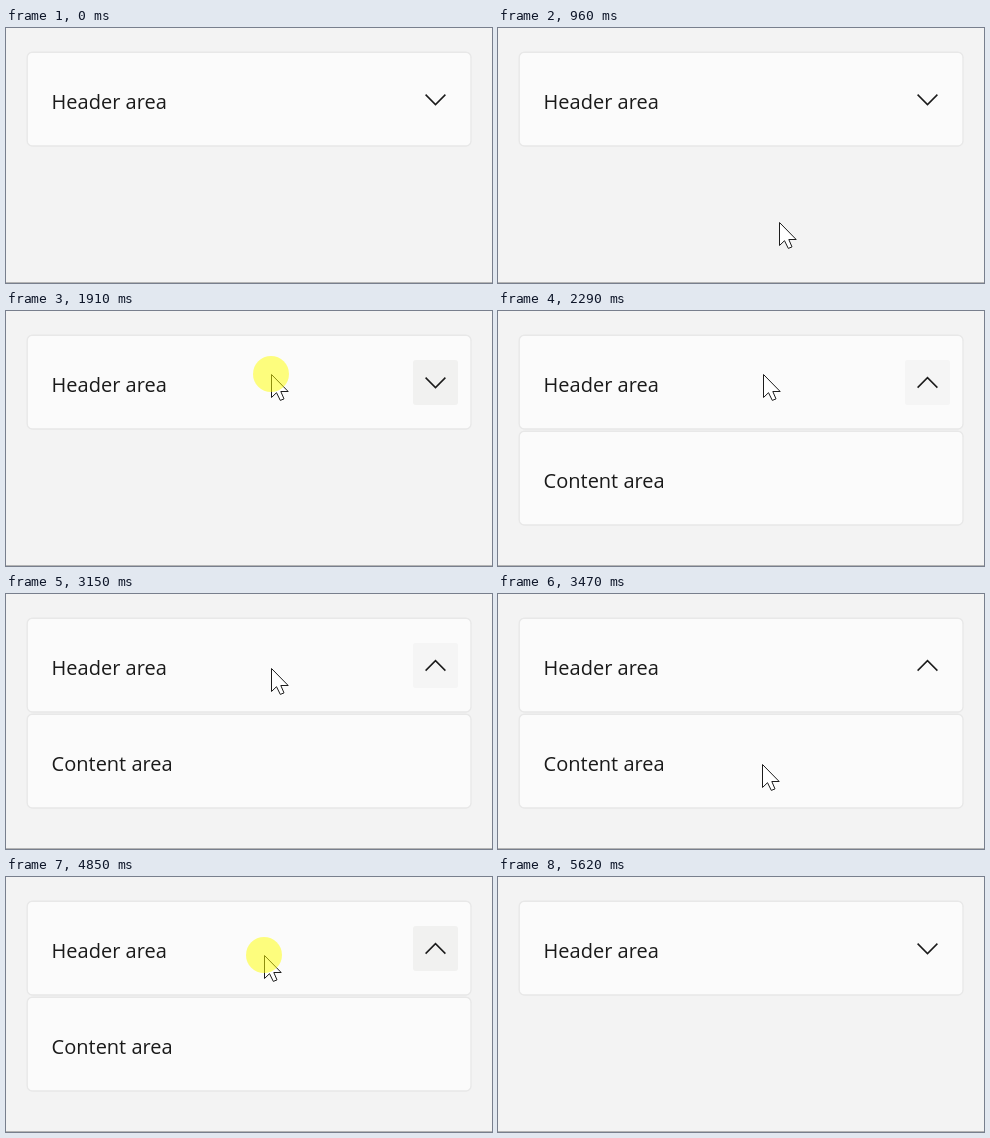
These frames come from a looping animation (486x255 px, 6560 ms). An HTML page:

```html
<!DOCTYPE html>
<html lang="en">
<head>
<meta charset="utf-8">
<title>Expander</title>
<style>
  html, body { margin: 0; width: 100%; height: 100%; overflow: hidden; background: #f3f3f3; }
  svg { display: block; }
  text { font: 20px "Open Sans", "Noto Sans", sans-serif; fill: #1a1a1a; }
  .card { fill: #fbfbfb; stroke: #e8e8e8; stroke-width: 1.4; }
</style>
</head>
<body>
<svg width="486" height="255" viewBox="0 0 486 255">
  <clipPath id="below"><rect y="119" width="486" height="136"/></clipPath>
  <rect y="254" width="486" height="1" fill="#b4b4b4"/>
  <g clip-path="url(#below)">
    <g id="content">
      <rect class="card" x="21.2" y="120.2" width="443.8" height="93.8" rx="5"/>
      <text x="45.6" y="177">Content area</text>
    </g>
  </g>
  <rect class="card" x="21.2" y="24.2" width="443.8" height="93.8" rx="5"/>
  <text x="45.6" y="81">Header area</text>
  <rect id="button" x="407" y="49" width="45" height="45" rx="3"/>
  <path id="chevron" fill="none" stroke="#1a1a1a" stroke-width="1.5"/>
  <g id="cursor">
    <path d="M.5 .5V23.5L5.5 18.7L9.3 26.4L13 24.9L9.8 17.5H17.2Z" fill="#fff" stroke="#1c1c1c"/>
    <circle id="click" r="18" fill="#ff0" fill-opacity=".5"/>
  </g>
</svg>
<script>
const LOOP = 6560;
const $ = id => document.getElementById(id);
const content = $('content'), button = $('button'), chevron = $('chevron');
const cursor = $('cursor'), click = $('click');

const easeOut = u => 1 - (1 - u) ** 2;
const easeInOut = u => u * u * (3 - 2 * u);
const easeIn = u => u ** 1.5;

// Cursor moves: start, end, steps, from, to, easing
const moves = [
  [731, 1360, 8, [291, 290], [269, 71], easeOut],
  [1360, 1430, 1, [269, 71], [268, 70], easeOut],
  [1420, 1600, 2, [268, 70], [265, 63], easeOut],
  [3070, 3470, 5, [265, 63], [264, 170], easeInOut],
  [3844, 4450, 8, [264, 170], [258, 78], easeInOut],
  [5300, 5620, 4, [258, 78], [268, 278], easeIn],
];

// Progress from 0 to 1 in equal held steps
function stepped(t, start, end, n) {
  const u = Math.min(1, Math.max(0, (t - start) / (end - start)));
  return Math.floor(u * n + 1e-6) / n;
}

function cursorAt(t) {
  const [start, end, n, from, to, ease] = moves.findLast(m => t >= m[0]) || moves[0];
  const p = ease(stepped(t, start, end, n));
  return from.map((v, i) => Math.round(v + (to[i] - v) * p));
}

function draw(t) {
  const [x, y] = cursorAt(t);
  const pressed = (t >= 1910 && t < 1979) || (t >= 4850 && t < 4920);
  const u = t < 4920 ? stepped(t, 1902, 2290, 5) : 0;
  const open = 1 - (1 - u) ** 3;

  cursor.setAttribute('transform', `translate(${x} ${y})`);
  click.style.display = pressed ? '' : 'none';
  button.setAttribute('fill', pressed ? '#f1f1f0' : y < 118 ? '#f5f5f5' : 'none');
  content.style.display = u ? '' : 'none';
  content.setAttribute('transform', `translate(0 ${-96 * (1 - open)})`);

  const mid = 71.6, h = 5 * (1 - 2 * open);
  chevron.setAttribute('d', `M419.6 ${mid - h}L429.5 ${mid + h}L439.4 ${mid - h}`);
}

const begin = performance.now();
function tick() {
  draw((performance.now() - begin) % LOOP);
  requestAnimationFrame(tick);
}
tick();
</script>
</body>
</html>
```
